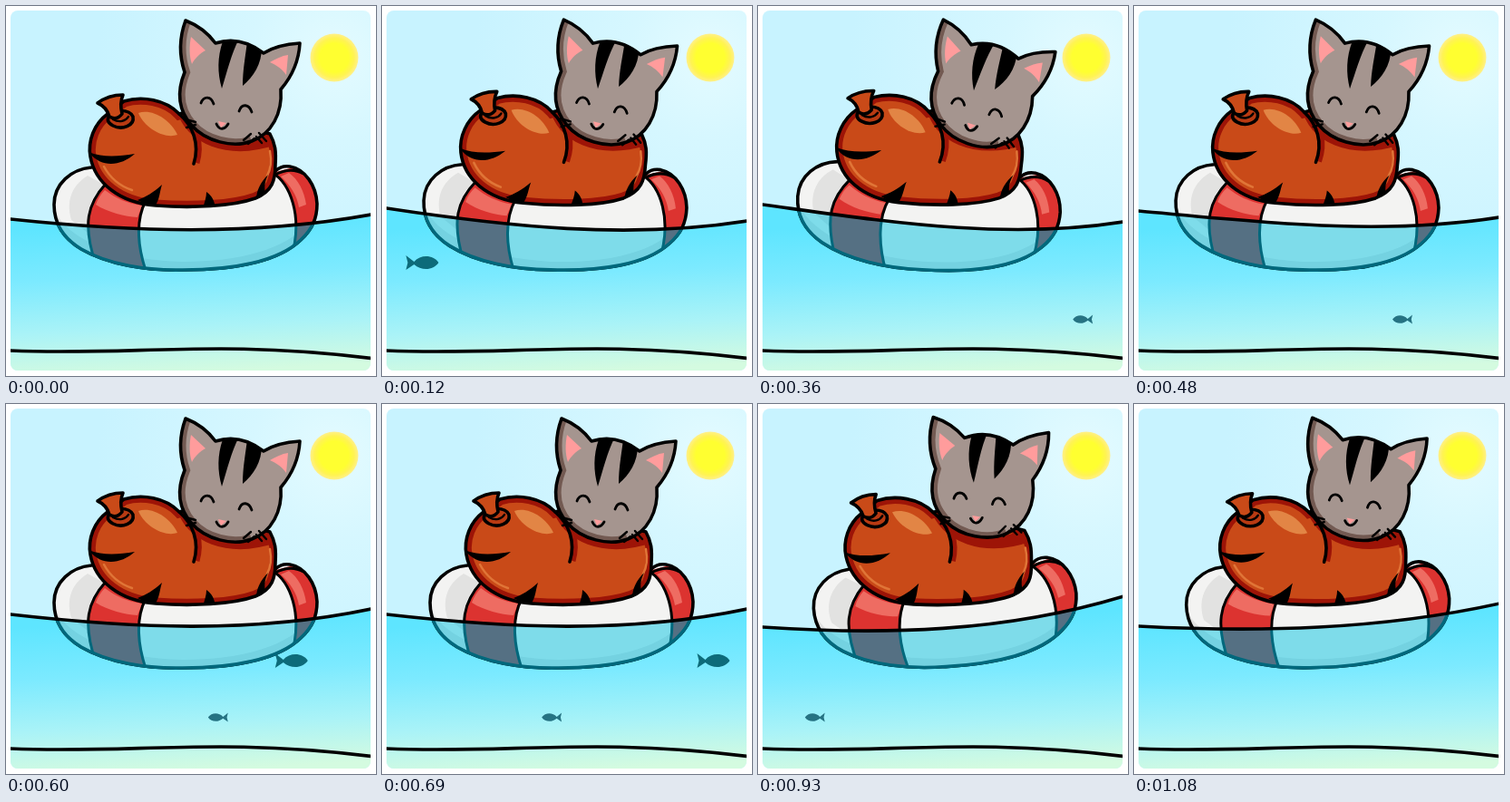
An HTML page that plays this animation: 408x408 px, repeating every 1210 ms.

```html
<!DOCTYPE html>
<html lang="en">
<head>
<meta charset="utf-8">
<title>Cat on a swim ring</title>
<style>
  html, body { margin: 0; width: 100%; height: 100%; overflow: hidden; background: #fff; }
  svg { display: block; width: 100vw; height: 100vh; }
  .line { fill: none; stroke: #000; stroke-width: 3.6; stroke-linejoin: round; stroke-linecap: round; }
  .thin { fill: none; stroke: #000; stroke-width: 2.4; stroke-linecap: round; }
  .dry { --white: #f3f3f2; --shade: #e2e2e1; --red: #dc3330; --pink: #ee6c62; --edge: #000; }
  .wet { --white: #7edcea; --shade: #74d2e1; --red: #557083; --pink: #5f7c8d; --edge: #00687c; }
</style>
</head>
<body>
<svg viewBox="0 0 408 408">
  <defs>
    <radialGradient id="sky" gradientUnits="userSpaceOnUse" cx="362" cy="57" r="260">
      <stop offset="0" stop-color="#e4fbff"/><stop offset=".35" stop-color="#d6f7ff"/>
      <stop offset="1" stop-color="#c8f3ff"/>
    </radialGradient>
    <radialGradient id="sun">
      <stop offset=".6" stop-color="#ffff30"/><stop offset=".82" stop-color="#fff353"/>
      <stop offset="1" stop-color="#fff08a"/>
    </radialGradient>
    <linearGradient id="sea" gradientUnits="userSpaceOnUse" x1="190" y1="238" x2="198" y2="404">
      <stop offset="0" stop-color="#5ee5ff"/><stop offset=".35" stop-color="#7ceaff"/>
      <stop offset=".7" stop-color="#aaf3f7"/><stop offset="1" stop-color="#d4fbe0"/>
    </linearGradient>
    <clipPath id="stage"><rect x="5" y="5" width="397" height="397" rx="8"/></clipPath>
    <clipPath id="under"><path class="water"/></clipPath>

    <path id="rim" d="M94 178C72 180 53 196 53 219C53 240 63 256 83 268C112 285 155 292 195 291C250 291 300 282 325 258C338 246 343 234 343 218C342 198 330 180 313 177C306 176 301 178 297 182L200 150Z"/>
    <clipPath id="inRim"><use href="#rim"/></clipPath>
    <g id="ring">
      <use href="#rim" fill="var(--white)"/>
      <g clip-path="url(#inRim)">
        <path d="M53 219C54 243 100 280 195 282C270 282 332 262 343 218V300H50Z" fill="var(--shade)"/>
        <path d="M90 187C72 198 66 216 72 236L90 250C88 225 95 208 108 197Z" fill="var(--shade)"/>
        <path d="M110 196C90 218 84 240 99 285L157 300C144 266 143 236 154 215Z" fill="var(--red)"/>
        <path d="M109 203C104 208 101 213 99 219C113 228 131 232 145 233L150 220C134 218 121 212 109 203Z" fill="var(--pink)"/>
        <path d="M294 184C312 195 329 230 314 280L350 265V200L324 176Z" fill="var(--red)"/>
        <path d="M303 188C314 198 321 209 323 222L331 219C329 204 322 191 312 184Z" fill="var(--pink)"/>
        <path d="M110 196C90 218 84 240 99 285M154 215C143 236 144 266 157 300M294 184C312 195 329 230 314 280M297 186C308 180 319 180 328 185"
          fill="none" stroke="var(--edge)" stroke-width="3"/>
      </g>
      <use href="#rim" fill="none" stroke="var(--edge)" stroke-width="3.6"/>
    </g>

    <path id="torso" d="M112 119C97 130 90 149 93 166C98 195 125 217 165 220C205 223 250 221 275 212C294 204 297 192 297 175C298 160 297 152 291 141L202 116L191 119C176 103 150 99 130 105Z"/>
    <clipPath id="inTorso"><use href="#torso"/></clipPath>
    <path id="skull" d="M198 16C191 35 191 55 197 73C188 95 190 115 205 132C220 149 250 157 271 149C293 141 305 118 303 92C315 78 323 60 324 41C308 42 295 45 284 52C266 38 247 36 231 41C222 29 211 21 198 16Z"/>
    <clipPath id="inSkull"><use href="#skull"/></clipPath>
    <path id="fish" d="M18 0C12 -9 -2 -9 -9 -1L-18 -8L-16 0L-18 8L-9 2C-1 9 12 9 18 0Z"/>
  </defs>

  <g clip-path="url(#stage)">
    <rect width="408" height="408" fill="url(#sky)"/>
    <circle cx="362" cy="57" r="26.5" fill="url(#sun)"/>
    <path class="water" fill="url(#sea)"/>
    <use id="bigFish" href="#fish" fill="#0d6b7a"/>
    <use id="smallFish" href="#fish" fill="#267383"/>

    <use class="dry float" href="#ring"/>
    <g clip-path="url(#under)"><use class="wet float" href="#ring"/></g>

    <g id="body">
      <use href="#torso" fill="#c94a18"/>
      <g clip-path="url(#inTorso)">
        <use href="#torso" fill="none" stroke="#9d1407" stroke-width="13"/>
        <path d="M195 112C202 145 245 164 297 146" fill="none" stroke="#9d1407" stroke-width="14"/>
        <path d="M194 120C210 134 216 152 210 173" fill="none" stroke="#9d1407" stroke-width="7"/>
        <path d="M146 118C161 113 181 125 189 142C175 147 153 135 146 118Z" fill="#e28545"/>
        <path d="M108 177C115 190 127 199 139 203M291 160C293 171 292 180 288 187" fill="none" stroke="#e07537" stroke-width="2.5" stroke-linecap="round"/>
        <path d="M91 161C106 167 123 166 142 163C126 177 105 179 91 161ZM172 197C162 206 155 210 145 214L163 223C170 213 169 206 172 197ZM221 205C221 211 219 216 217 223H231C230 215 227 209 221 205ZM289 186C281 194 276 203 276 214L287 209C284 201 285 194 289 186Z"/>
      </g>
      <use href="#torso" class="line"/>
      <path class="line" d="M191 119C206 132 214 152 207 174"/>
      <path class="line" style="fill:#b83a12" d="M114 121C117 114 136 113 140 122C142 132 128 137 118 132C112 129 111 125 114 121Z"/>
      <path class="line" style="fill:#c94a18" d="M101 107C109 101 119 98 129 98C126 105 126 111 128 119C124 124 119 125 114 122C112 115 108 110 101 107Z"/>
      <path class="thin" d="M118 125C125 129 132 127 135 122"/>
    </g>

    <g id="head">
      <use href="#skull" fill="#a5958f"/>
      <g clip-path="url(#inSkull)">
        <path d="M198 16C191 35 191 55 197 73C188 95 190 115 205 132C220 149 250 157 271 149" fill="none" stroke="#735a52" stroke-width="12"/>
        <path d="M239 39C233 56 233 74 238 91C244 72 248 54 257 36ZM266 39C264 56 261 70 261 88C273 78 282 64 282 46Z"/>
      </g>
      <path d="M204 34L220 49C214 52 208 58 205 64C202 55 202 44 204 34ZM311 54L309 76C304 69 298 65 291 62C298 58 304 55 311 54Z" fill="#ff9c9c"/>
      <use href="#skull" class="line"/>
      <path class="thin" d="M198 125L209 128M199 134L209 131M262 148L270 141M267 152L274 146M279 140L287 149M276 144L282 151"/>
      <path class="thin" style="stroke-width:2.8" d="M215 107C218 99 226 99 229 108M257 116C260 107 268 108 271 117M232 130C235 137 241 137 245 130"/>
      <path d="M234 127L243 129L237 134Z" fill="#ff9c9c"/>
    </g>

    <path id="surface" class="line"/>
    <path class="line" d="M5 380C140 386 230 367 403 388.5"/>
  </g>
</svg>
<script>
  // Fish swim on every step; the sea, ring and cat hold each pose for four steps
  const STEP = 30, HOLD = 4, LAST = 39, LOOP = 1210;

  // The cat rocks through five poses, from leaning left to leaning right, and back
  const rocking = [2, 3, 4, 4, 3, 2, 1, 0, 0, 1];
  const cat = {
    ringX: [9, 5, 0, -7.5, -10.5],
    ringY: [-1.5, -.5, 0, 0, 0],
    ringTurn: [-3.1, -1.2, 0, 1.8, 3.6],
    bodyX: [4, 2.5, 0, -6, -6],
    bodyY: [.3, .3, 0, -2, -2.5],
    bodyLean: [-.6, -.2, 0, .8, 1],
    headY: [-2.5, -1, 0, -.5, 0],
    headTurn: [-3.6, -1, 0, 1.8, 4.8]
  };
  const sea = {
    left: [235, 223, 214, 219, 226, 232, 240, 246, 248, 245],
    bend1: [249, 243, 239, 237, 238, 247, 250, 255, 255, 252],
    bend2: [254, 258, 262, 259, 254, 254, 253, 252, 250, 249],
    right: [230, 237, 241, 238, 233, 226, 222, 212, 214, 220]
  };
  const set = (s, name, value) =>
    document.querySelectorAll(s).forEach(el => el.setAttribute(name, value));

  function draw() {
    const i = Math.min(LAST, Math.floor(performance.now() % LOOP / STEP));
    const beat = Math.floor(i / HOLD);
    const p = {};
    for (const key in sea) p[key] = sea[key][beat];
    for (const key in cat) p[key] = cat[key][rocking[beat]];

    const wave = `M5 ${p.left}C137 ${p.bend1} 271 ${p.bend2} 403 ${p.right}`;
    set('#surface', 'd', wave);
    set('.water', 'd', wave + 'V408H5Z');
    set('.float', 'transform', `translate(${p.ringX} ${p.ringY}) rotate(${p.ringTurn} 198 235)`);
    set('#body', 'transform', `translate(${195 + p.bodyX} ${165 + p.bodyY})
      matrix(1 ${.03 * p.bodyLean} ${-.07 * p.bodyLean} 1 0 0) translate(-195 -165)`);
    set('#head', 'transform', `translate(0 ${p.headY}) rotate(${p.headTurn} 212 92)`);
    set('#bigFish', 'transform', `translate(${112 + 16.9 * (i - 8)} 283)`);
    set('#smallFish', 'transform', `translate(${296 - 15.55 * (i - 16)} 345.5) scale(-.61 .62)`);
    requestAnimationFrame(draw);
  }
  draw();
</script>
</body>
</html>
```
